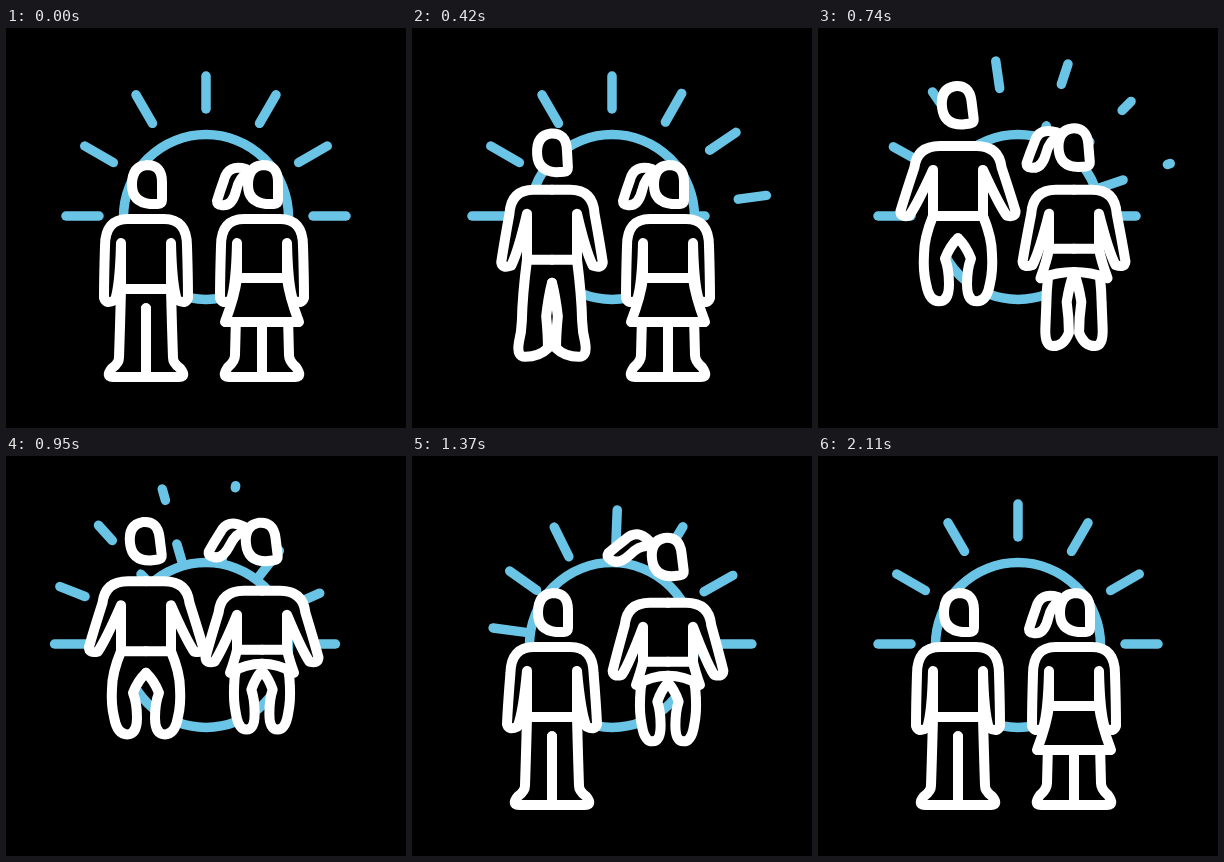
These frames come from a looping animation (400x400 px, 2220 ms). An HTML page with a canvas:

```html
<!DOCTYPE html>
<html>
<head>
<meta charset="utf-8">
<title>Jumping friends</title>
<style>
html, body { margin: 0; width: 100%; height: 100%; overflow: hidden; background: #000; }
canvas { display: block; width: 400px; height: 400px; }
</style>
</head>
<body>
<canvas id="stage" width="400" height="400"></canvas>
<script>
const ctx = document.getElementById('stage').getContext('2d');
const LOOP = 2220, STEPS = 21;
const GROUND = 349, SHOULDER = 191, HEAD = 157;
const { sin, cos, min, max, PI } = Math;
const clamp = v => max(0, min(1, v));
const mix = (a, b, u) => a + (b - a) * u;
const rad = degrees => degrees * PI / 180;
ctx.lineCap = ctx.lineJoin = 'round';

// Times are in steps of the loop; neck and foot say how far head and feet follow the body.
const man = { axis: 140, start: 3, span: 9, height: 74, neck: 1.08, foot: 1.05, waist: 70, slim: 1 };
const woman = { axis: 256, start: 5.7, span: 9.5, height: 62, neck: 1.25, foot: 1.4, waist: 59, slim: 0.82, skirt: true };

// Curves: a start point, then pairs of control and end point.
const headShape = [0,-20, 15,-20, 15,-3, 15,5, 15,15, 15,19, 11,19, 6,19, 3,19, -15,17, -15,0, -15,-19, 0,-20];
const tailShape = [0,0, -18,-5, -22,11, -26,22, -29,32, -29,36, -25,36, -14,38, -10,22, -7,8, 2,4];
// Arm around the shoulder joint, from outside to inside
const armShape = [-11,17, -12,49, -12,69, -10,76, -1,71, 4,56];
// Left leg, from hip to foot and back up; y as a share of the leg length
const planted = [-25,0, -26,.45, -27,.78, -27,.84, -34,.9, -41,1, -33,1, -16,1, 0,1, 0,.9, 0,.65, 0,.4, 0,.22];
const hanging = [-25,0, -34,.26, -34,.45, -35,.64, -32,.79, -29,1, -19,1, -9,1, -9,.8, -9,.62, -13,.5, -8,.35, 0,.26];

function trace(p) {
  ctx.beginPath();
  ctx.moveTo(p[0], p[1]);
  for (let i = 2; i < p.length; i += 4) ctx.quadraticCurveTo(p[i], p[i + 1], p[i + 2], p[i + 3]);
}

function mirrored(p) {
  const both = paint => [1, -1].forEach(side => {
    ctx.save();
    ctx.scale(side, 1);
    trace(p);
    paint();
    ctx.restore();
  });
  both(() => { ctx.lineTo(0, p[1]); ctx.fill(); });
  both(() => ctx.stroke());
}

function shape(p, x, y, degrees) {
  ctx.save();
  ctx.translate(x, y);
  ctx.rotate(rad(degrees));
  trace(p);
  ctx.fill();
  ctx.stroke();
  ctx.restore();
}

function bodyCurve(top, waist, swing) {
  const c = cos(rad(17 * swing)), s = sin(rad(17 * swing)), size = 1 - 0.12 * swing, arm = [];
  for (let i = 0; i < armShape.length; i += 2) {
    const [x, y] = armShape.slice(i, i + 2);
    arm.push(-30 + size * (x * c - y * s), top + 10 + size * (y * c + x * s));
  }
  return [0, top, -9, top, -18, top, -41, top, ...arm,
    -25, top + 24, -25, top + 40, -25, waist, -12, waist, 0, waist];
}

function legCurve(waist, foot, bend, slim) {
  return planted.map((v, i) => i % 2
    ? waist + (foot - waist) * mix(v, hanging[i], bend)
    : mix(v, hanging[i] * slim, bend));
}

function skirtCurve(waist, float) {
  const hem = waist + 44 - 21 * float, width = 37 - 5 * Math.abs(float), middle = hem - 9 * float;
  return [-25, waist, -27, mix(waist, hem, 0.4), -width, hem, -width / 2, middle, 0, middle];
}

function drawFigure(f, step) {
  // Height of a jump that may leave the ground a little late
  const jump = late => {
    const u = clamp((step - f.start - late) / (f.span - late));
    return 4 * u * (1 - u) * f.height;
  };
  const lift = jump(0), footLift = f.foot * jump(0.4);
  const bend = clamp(footLift / 45);
  const swing = sin(PI * clamp((step - f.start + 1.5) / (f.span + 3.5))) ** 1.3;
  const top = SHOULDER - lift, waist = top + f.waist;
  const headX = 1 - 2 * bend, headY = HEAD - lift * f.neck;

  ctx.save();
  ctx.translate(f.axis, 0);
  ctx.fillStyle = '#000';
  ctx.strokeStyle = '#fff';
  ctx.lineWidth = 10;
  mirrored(legCurve(waist, GROUND - footLift, bend, f.slim));
  if (f.skirt) {
    // Hair and skirt fly up while falling and drop past their rest after landing
    const u = (step - f.start) / f.span, wave = sin(PI * max(0, min(2, u * Math.abs(u))));
    const drag = wave < 0 ? wave / 2 : wave;
    mirrored(skirtCurve(waist, drag < 0 ? drag : bend));
    mirrored(bodyCurve(top, waist, swing));
    shape(tailShape, headX - 17, headY - 16, 34 * drag);
  } else {
    mirrored(bodyCurve(top, waist, swing));
  }
  shape(headShape, headX, headY, -7 * bend);
  ctx.restore();
}

function ray(degrees, inner, outer) {
  const c = cos(rad(degrees)), s = -sin(rad(degrees));
  ctx.beginPath();
  ctx.moveTo(200 + inner * c, 188 + inner * s);
  ctx.lineTo(200 + outer * c, 188 + outer * s);
  ctx.stroke();
}

// Each ray drifts outward and vanishes while its successor grows out of the sun.
function drawSun(step) {
  ctx.strokeStyle = '#6ac4e6';
  ctx.lineWidth = 9.5;
  ctx.beginPath();
  ctx.arc(200, 189, 82.5, 0, 2 * PI);
  ctx.stroke();
  for (let i = 0; i < 7; i++) {
    const age = step - 0.95 * i, gone = max(0, age - 2);
    const outer = 161 - 21 * (1 - clamp(gone / 4)) ** 2, inner = 107 + 10.2 * gone;
    if (inner < outer) ray(30 * i + (i < 6 ? 3.8 * gone : 0), inner, outer);
    if (age > 3.5) {
      const rest = (1 - clamp((age - 4) / 9.5)) ** 2, tip = 140 - 47 * rest;
      ray(30 * i - (i ? 18 * rest : 0), max(83, tip - 33), tip);
    }
  }
}

function draw(now) {
  const step = Math.floor((now % LOOP + 5) * STEPS / LOOP) % STEPS;
  ctx.fillStyle = '#000';
  ctx.fillRect(0, 0, 400, 400);
  drawSun(step);
  drawFigure(man, step);
  drawFigure(woman, step);
  requestAnimationFrame(draw);
}
requestAnimationFrame(draw);
</script>
</body>
</html>
```
